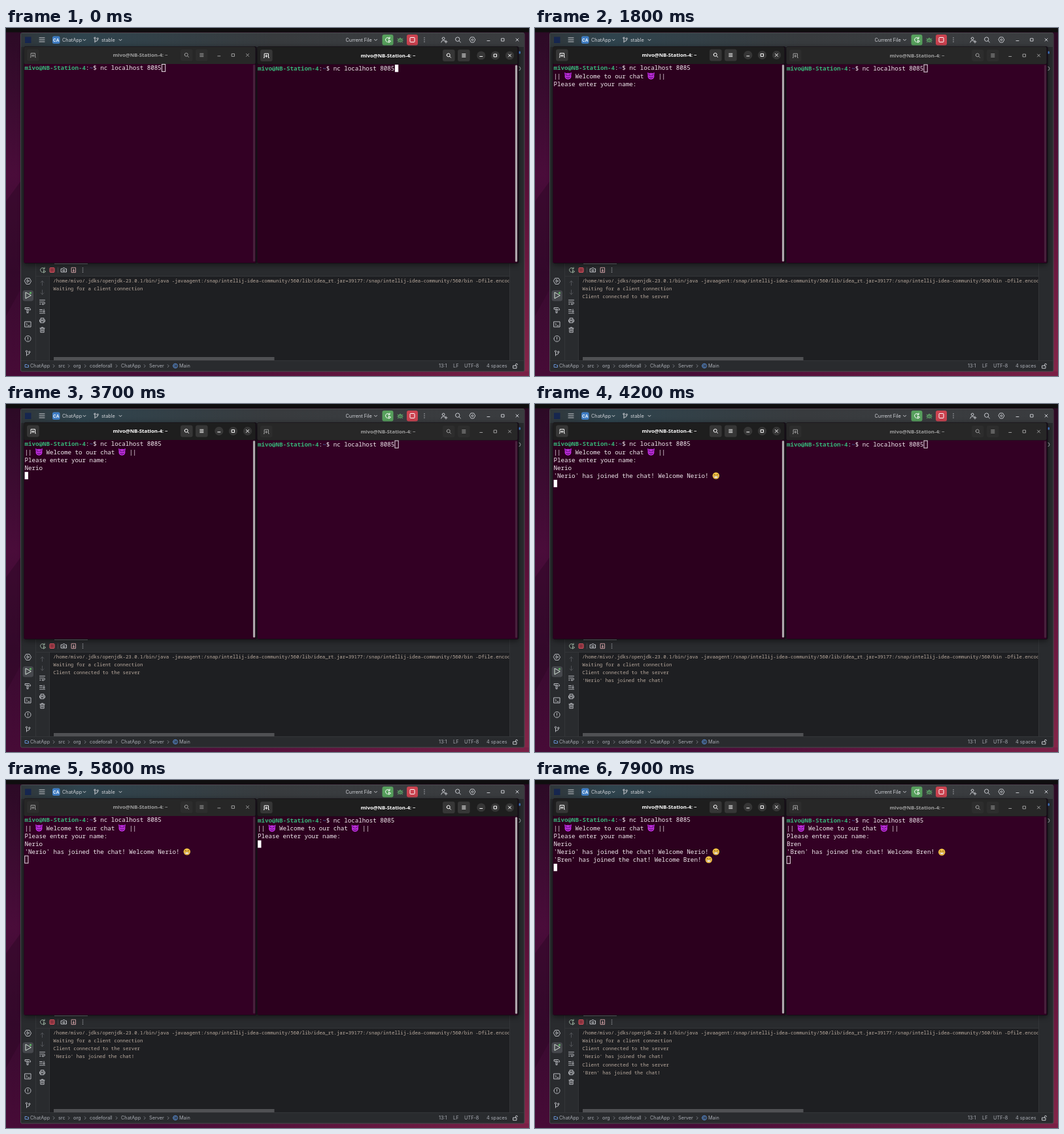
An HTML page for the animation above (8 s loop, 800 by 532 pixels).

```html
<!DOCTYPE html>
<html lang="en">
<head>
<meta charset="utf-8">
<title>Chat server demo</title>
<style>
  html, body { margin: 0; width: 100%; height: 100%; overflow: hidden; background: #0f0e0f; }
  svg { display: block; width: 800px; height: 532px; }
  text { white-space: pre; }
  .ui { font: 7.3px Inter, sans-serif; fill: #cfd1d6; }
  .log { font: 7.38px "Noto Sans Mono", monospace; fill: #bbaca0; }
  .term { font: 9.2px "Noto Sans Mono", monospace; fill: #f1ebef; }
  .title { font: bold 7.8px "Noto Sans", sans-serif; text-anchor: middle; }
  .icon { fill: none; stroke-width: 1; stroke-linejoin: round; stroke-linecap: round; }
</style>
</head>
<body>
<svg viewBox="0 0 800 532">
  <defs>
    <linearGradient id="wall" x2="0" y2="1">
      <stop offset="0" stop-color="#2b0a25"/><stop offset=".42" stop-color="#4a0c3a"/>
      <stop offset=".7" stop-color="#380a2f"/><stop offset="1" stop-color="#470b37"/>
    </linearGradient>
    <linearGradient id="wallRight" x2="0" y2="1">
      <stop offset="0" stop-color="#2a0a24"/><stop offset=".5" stop-color="#5c1039"/>
      <stop offset="1" stop-color="#842649"/>
    </linearGradient>
    <linearGradient id="wallBottom">
      <stop offset=".3" stop-color="#7a2046" stop-opacity="0"/><stop offset="1" stop-color="#7a2046"/>
    </linearGradient>
    <linearGradient id="bar">
      <stop offset="0" stop-color="#30373b"/><stop offset=".12" stop-color="#2f444e"/>
      <stop offset=".5" stop-color="#383b3e"/><stop offset="1" stop-color="#3a3c3f"/>
    </linearGradient>
    <filter id="blur"><feGaussianBlur stdDeviation="4"/></filter>
    <clipPath id="logArea"><path d="M66 379H769.5V508H66z"/></clipPath>
    <g id="devil">
      <path d="M-5.6-5.6Q-2-4.6-1-2.5L-4.4 0Q-5.8-3-5.6-5.6M5.6-5.6Q2-4.6 1-2.5L4.4 0Q5.8-3 5.6-5.6" fill="#9c1fb8"/>
      <circle r="5" cy=".4" fill="#bb2cd8"/>
      <path d="M-3.2-1.8-.8-.5M3.2-1.8.8-.5M-2.4 2.3Q0 4.2 2.4 2.3" class="icon" stroke="#430a58"/>
    </g>
    <g id="grin">
      <circle r="5.2" fill="#f6c445"/>
      <path d="M-3.2-1.3Q-2-2.8-.9-1.3M.9-1.3Q2-2.8 3.2-1.3" class="icon" stroke="#69451a" stroke-width=".8"/>
      <path d="M-3.3.8H3.3Q2.5 3.6 0 3.6T-3.3.8" fill="#fff" stroke="#8a5b22" stroke-width=".5"/>
    </g>
  </defs>
  <g id="ide"></g>
  <g id="live"></g>
</svg>
<script>
const LOOP = 8000, CELL = 5.52, ROW = 12.1, FADE = 200;
const USER = 'mivo', HOST = 'NB-Station-4', FIRST = 'Nerio', SECOND = 'Bren';

const rect = (x, y, w, h, fill, r = 0, extra = '') =>
  `<rect x="${x}" y="${y}" width="${w}" height="${h}" fill="${fill}" rx="${r}" ${extra}/>`;
const text = (x, y, s, cls = 'ui', extra = '') => `<text x="${x}" y="${y}" class="${cls}" ${extra}>${s}</text>`;
const icon = (x, y, d, color = '#c6c8cd') =>
  `<path class="icon" transform="translate(${x} ${y})" d="${d}" stroke="${color}"/>`;
const ring = (x, y, r) => `M${x - r} ${y}a${r} ${r} 0 1 0 ${2 * r} 0a${r} ${r} 0 1 0 ${-2 * r} 0`;

const shape = {
  menu: 'M-4-3H4M-4 0H4M-4 3H4',
  list: 'M-2.6-2.2H2.6M-2.6 0H2.6M-2.6 2.2H2.6',
  down: 'M-2-1 0 1 2-1',
  next: 'M-1-2 1 0-1 2',
  branch: ring(-2, -2.7, 1.2) + ring(2.3, -1.7, 1.2) + 'M-2-1.5V4M-2 2.2H0Q2.3 2.2 2.3-.5',
  rerun: 'M2.5-2.5A3.5 3.5 0 1 0 0 3.5M3-4V-1.7H.7M1.5.7V4.3L4.3 2.5z',
  bug: ring(0, .6, 2.7) + 'M-1.4-1.8Q0-4.4 1.4-1.8M-2.7-.2H2.7M0-.2V3.3M-4-1.8-2.5-.6M4-1.8 2.5-.6M-4.2 1H-2.7M4.2 1H2.7M-3.7 3.7-2 2.6M3.7 3.7 2 2.6',
  dots: 'M-.3-3H.3M-.3 0H.3M-.3 3H.3',
  person: ring(-.9, -2, 1.9) + 'M-4.3 4Q-4 1-1 1T2 2M3 1V5M1 3H5',
  search: ring(-.8, -.8, 3.2) + 'M1.5 1.6 4 4',
  find: ring(-.6, -.6, 2.5) + 'M1.3 1.3 3.2 3.2',
  gear: 'M-2-4H2L4.4 0 2 4H-2L-4.4 0z' + ring(0, 0, 1.4),
  minimize: 'M-2 1.5H2',
  maximize: 'M-2-2H2V2H-2z',
  close: 'M-2-2 2 2M2-2-2 2',
  tab: 'M-4 3.5H-3.2V-2.8H3.2V3.5H4M0-.8V2.6M-1.7.9H1.7',
  camera: 'M-4-2H-2L-1-3.3H1L2-2H4V3H-4z' + ring(0, .5, 1.4),
  exit: 'M-3-3.7H3V3.7H-3zM0-1.5V2M-1.3.8 0 2 1.3.8',
  hexPlay: 'M-2.5-4.5H2.5L5 0 2.5 4.5H-2.5L-5 0zM-1.3-2V2L2 0z',
  play: 'M-3.5-4.5V4.5L4.5 0z',
  hammer: 'M-4-3.5H2L4-1.5V0H2L1-1H-4zM-1.5-1V4.5H.5V-1',
  shell: 'M-4.5-4H4.5V4H-4.5zM-2.5-1.5-1 0-2.5 1.5M0 2H2.5',
  warn: ring(0, 0, 4.5) + 'M0-2.3V.4M0 2.2V2.3',
  up: 'M0 3.5V-3.5M-2.4-1 0-3.5 2.4-1',
  fall: 'M0-3.5V3.5M-2.4 1 0 3.5 2.4 1',
  wrap: 'M-4-3H4M-4 0H2.5Q4 0 4 1.5T2.5 3H0M1.3 1.8 0 3 1.3 4.2M-4 3H-2',
  toEnd: 'M-4-2.5H0M-4 0H0M-4 3H4M2.5-3V1M1 0 2.5 1.2 4 0',
  print: 'M-2.4-1V-3.5H2.4V-1M-2.4 2H-4V-1H4V2H2.4M-2.4.8H2.4V3.6H-2.4z',
  trash: 'M-3.6-2.5H3.6M-1.3-2.5V-3.8H1.3V-2.5M-2.7-2.5V3.8H2.7V-2.5M-.9-.7V2M.9-.7V2',
  lock: 'M-3-.5H2V3.5H-3zM.5-.5V-2Q.5-3.5 2-3.5T3.5-2',
  folder: 'M-2.5-2H0L1-1H2.5V2H-2.5z',
  classMark: ring(0, 0, 3.4) + 'M1.3-1A1.6 1.6 0 1 0 1.3 1'
};
const icons = (list, color) => list.map(([x, y, name, own]) => icon(x, y, shape[name], own || color)).join('');

function ide() {
  const crumbs = [[37, 'ChatApp'], [80, 'src'], [103, 'org'], [128, 'codeforall'],
    [176, 'ChatApp'], [219, 'Server'], [265, 'Main']];
  const status = [[662, '13:1'], [684, 'LF'], [701, 'UTF-8'], [735, '4 spaces']];
  return rect(0, 0, 800, 532, 'url(#wall)') +
    '<path d="M0 265 22 235V400L0 440z" fill="#300927" opacity=".55"/>' +
    rect(792, 0, 8, 532, 'url(#wallRight)') + rect(0, 525, 800, 7, 'url(#wallBottom)') +
    rect(0, 0, 800, 6.5, '#0f0e0f') +
    rect(22.5, 7.5, 770.5, 517.5, '#292b2e', 2, 'stroke="#4a4b4e"') +
    rect(23, 8, 769.5, 21, 'url(#bar)') +
    rect(66, 379, 704, 129, '#1e1f22') +
    '<path d="M45 379.5H770M66.5 379V508M23 508.5H792M770.5 360V508M45.5 360V508" stroke="#333538"/>' +
    rect(29, 13.5, 9.5, 9.5, '#16264f') +
    rect(71, 12.5, 11.5, 11.5, '#3f7dc4', 2.5) +
    text(76.8, 20.6, 'CA', 'ui', 'text-anchor="middle" style="font-size:6.6px;font-weight:600;fill:#fff"') +
    text(86, 20.8, 'ChatApp') + text(146, 20.8, 'stable') + text(519.5, 20.8, 'Current File') +
    rect(575.5, 10, 17, 16.5, '#57a05d', 3) + rect(613, 10, 17, 16.5, '#cb4350', 3) +
    icons([[55, 18, 'menu'], [120, 18.3, 'down'], [138, 18, 'branch'], [175, 18.3, 'down'], [565.5, 18.3, 'down'],
      [584, 18, 'rerun', '#fff'], [603, 18, 'bug', '#5fa868'], [640, 18, 'dots'], [670, 18, 'person'],
      [691.5, 18, 'search'], [713.5, 18, 'gear'], [738, 18, 'minimize'], [760, 18, 'maximize'], [782, 18, 'close']]) +
    rect(618, 14.5, 7, 7, 'none', 1, 'stroke="#fff"') +
    rect(784, 35.5, 3, 4, '#4b83d6', 1) + icon(784, 62, 'M0-3Q3-3 3 0T0 3', '#a8aab0') +
    rect(67, 366.5, 7, 7, '#8d3440', 1, 'stroke="#db5461"') +
    icon(79.5, 370, 'M0-4V4', '#43454a') +
    icons([[56, 370, 'rerun', '#9fb5a3'], [88.5, 370, 'camera'], [103.5, 370, 'exit', '#d0a1a5'], [117.5, 370, 'dots']]) +
    rect(25.5, 401, 16.5, 16.5, '#46484d', 3.5) +
    icons([[33.5, 387, 'hexPlay'], [33.5, 409, 'play', '#d4e2d6'], [33.5, 431, 'hammer'], [33.5, 453, 'shell'],
      [33.5, 475, 'warn'], [33.5, 497, 'branch'], [55.5, 390, 'up', '#505257'], [55.5, 404, 'fall', '#505257'],
      [55.5, 419, 'wrap'], [55.5, 433, 'toEnd'], [55.5, 447, 'print'], [55.5, 461.5, 'trash']], '#b9bbc0') +
    '<circle cx="37.5" cy="405" r="1.6" fill="#5fb865"/>' +
    rect(73, 503, 337.5, 5, '#505154') +
    crumbs.map(([x, s], i) => text(x, 519.2, s, 'ui', 'style="fill:#a9acb3"') +
      (i ? icon(x - 6.8 - (i === 6 ? 10 : 0), 516.7, shape.next, '#7c7f86') : '')).join('') +
    status.map(([x, s]) => text(x, 519.2, s, 'ui', 'style="fill:#a9acb3"')).join('') +
    icons([[32, 516.5, 'folder', '#6793d6'], [259, 516.5, 'classMark', '#5b91dc'], [779, 516.7, 'lock']]) +
    rect(27, 30, 757, 332, '#000', 4, 'opacity=".5" filter="url(#blur)"') +
    rect(74, 359, 51, 1.6, '#707277');
}

const terminals = [
  { x: 27.5, right: 381.5, top: 55, textX: 28.4, enter: 800, name: FIRST,
    keys: [2800, 3000, 3100, 3300, 3500], send: 3700, joins: [[3800, FIRST], [7100, SECOND]], blinkOff: [1400, 2000] },
  { x: 384.5, right: 782.5, top: 55.6, textX: 384.9, enter: 5000, name: SECOND,
    keys: [6200, 6300, 6300, 6400], send: 7000, joins: [[7100, SECOND]], blinkOff: [0, 0] }
];
const consoleLog = [
  [0, `/home/${USER}/.jdks/openjdk-23.0.1/bin/java -javaagent:/snap/intellij-idea-community/560/lib/idea_rt.jar=39177:/snap/intellij-idea-community/560/bin -Dfile.encoding=UTF-8`],
  [0, 'Waiting for a client connection'],
  [1000, 'Client connected to the server'],
  [3900, `'${FIRST}' has joined the chat!`],
  [5900, 'Client connected to the server'],
  [7400, `'${SECOND}' has joined the chat!`]
];

// 1 when the left window has the focus, 0 when the right one has it
function leftFocus(t) {
  const ramp = start => Math.min(1, Math.max(0, (t - start) / FADE));
  const ease = p => 1 - (1 - p) ** 2;
  return ease(ramp(650)) - ease(ramp(4450)) + ease(ramp(7650));
}
const mix = (from, to, p) => `rgb(${from.map((v, i) => Math.round(v + (to[i] - v) * p))})`;
const gray = (from, to, p) => mix([from, from, from], [to, to, to], p);

function sessionLines(s, t) {
  const lines = [`${USER}@${HOST}:~$ nc localhost 8085`];
  if (t >= s.enter) {
    lines.push('|| 👿 Welcome to our chat 👿 ||', 'Please enter your name:',
      s.name.slice(0, s.keys.filter(k => k <= t).length));
  }
  if (t >= s.send) lines.push('');
  for (const [at, who] of s.joins) {
    if (t >= at) lines.splice(-1, 1, `'${who}' has joined the chat! Welcome ${who}! 😁`, '');
  }
  return lines;
}

function lineMarkup(line, row, s) {
  const y = s.top + row * ROW + 9.4;
  if (!row) {
    const [login, rest] = line.split(':~');
    return text(s.textX, y, `<tspan font-weight="bold" fill="#36b377">${login}</tspan>:<tspan fill="#4a7fbd">~</tspan>${rest}`, 'term');
  }
  let col = 0;
  return line.split(/(👿|😁)/u).map(part => {
    const x = s.textX + col * CELL;
    col += part.length;
    if (part === '👿' || part === '😁') {
      return `<use href="#${part === '👿' ? 'devil' : 'grin'}" x="${x + CELL}" y="${y - 3.2}"/>`;
    }
    return part && text(x, y, part, 'term');
  }).join('');
}

function terminal(s, focus, t) {
  const { x, right, top } = s, width = right - x, cy = top - 13.6;
  const ink = gray(158, 255, focus), button = gray(45, 54, focus);
  const lines = sessionLines(s, t), row = lines.length - 1;
  const cx = s.textX + lines[row].length * CELL, cursorY = top + row * ROW;
  const hidden = t >= s.blinkOff[0] && t < s.blinkOff[1];
  const cursor = focus > .5
    ? (hidden ? '' : rect(cx + .2, cursorY + .4, CELL - .2, ROW - .8, '#fff'))
    : rect(cx + .3, cursorY + .5, CELL - .3, ROW - 1, 'none', 0, 'stroke="#e6dfe4"');
  return rect(x, 28, width + 2, 332, '#150d16', 3) +
    rect(x, 28.5, width, 27, gray(39, 30, focus), 3) +
    rect(x, top, width, 359 - top, mix([51, 0, 36], [44, 0, 30], focus)) +
    rect(right - 3.6, top + 1, 3.2, 301, mix([72, 32, 60], [174, 168, 172], focus), 1.6) +
    [x + 13.8, right - 105.2, right - 82.2].map(b => rect(b - 9.3, cy - 9, 18.6, 18, button, 3)).join('') +
    [12, 34, 55.7].map(d => `<circle cx="${right - d}" cy="${cy}" r="6.6" fill="${button}" opacity="${focus}"/>`).join('') +
    icons([[x + 13.8, cy, 'tab'], [right - 105.2, cy, 'find'], [right - 82.2, cy, 'list'],
      [right - 55.7, cy, 'minimize'], [right - 34, cy, 'maximize'], [right - 12, cy, 'close']], ink) +
    text((x + right) / 2 + 1, cy + 2.8, `${USER}@${HOST}: ~`, 'title', `fill="${ink}"`) +
    lines.map((line, i) => lineMarkup(line, i, s)).join('') + cursor;
}

const live = document.getElementById('live');
document.getElementById('ide').innerHTML = ide();
let shown = '';
function draw() {
  const t = performance.now() % LOOP, left = leftFocus(t);
  const log = consoleLog.filter(([at]) => t >= at)
    .map(([, s], i) => text(72.3, 388.8 + i * 12.2, s, 'log')).join('');
  const markup = `<g clip-path="url(#logArea)">${log}</g>` +
    terminal(terminals[0], left, t) + terminal(terminals[1], 1 - left, t);
  if (markup !== shown) live.innerHTML = shown = markup;
  requestAnimationFrame(draw);
}
draw();
</script>
</body>
</html>
```
